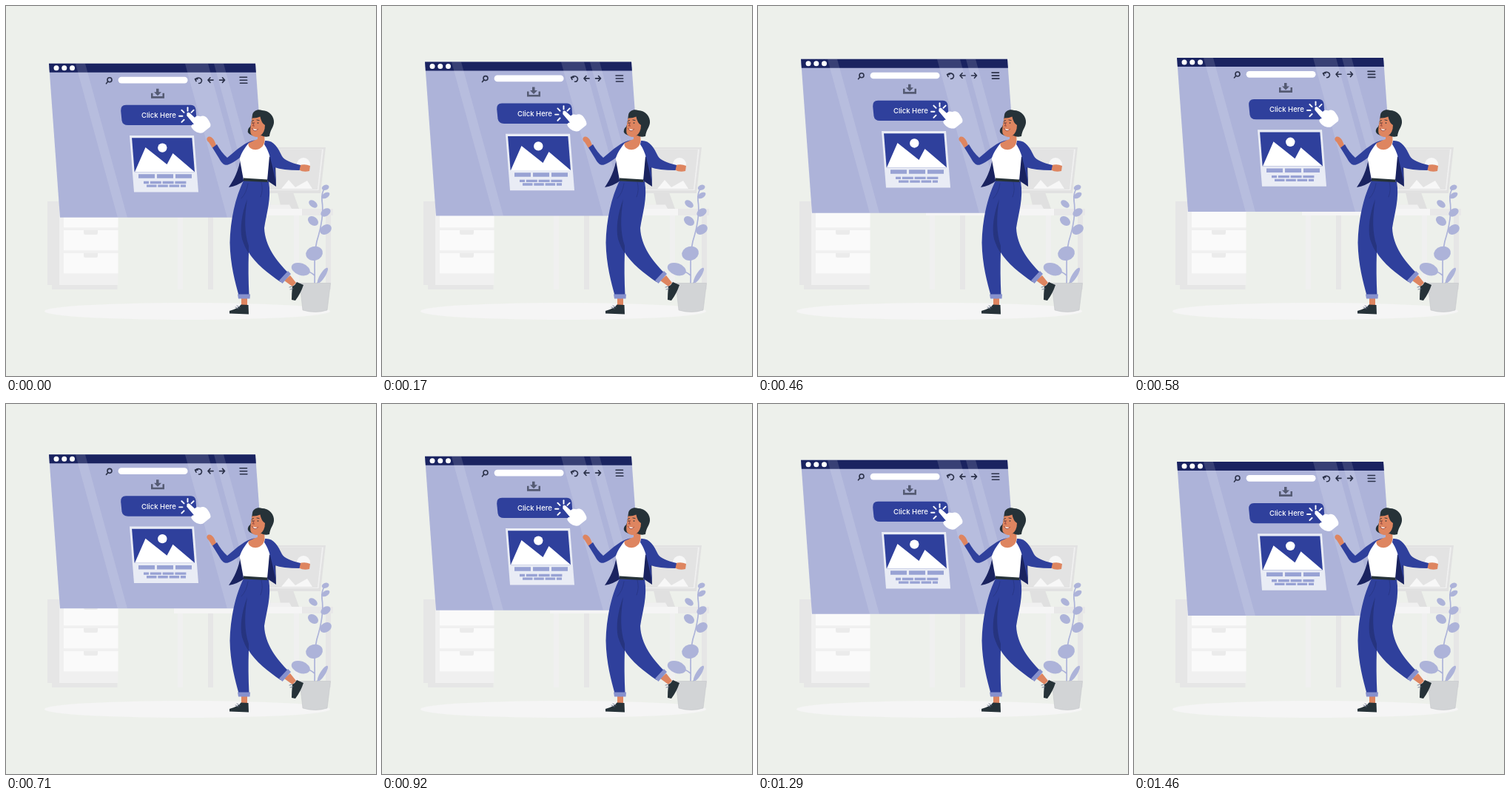
These frames come from a looping animation (500 by 500 pixels, 1500 ms). An HTML page:

```html
<!DOCTYPE html>
<html lang="en">
<head>
<meta charset="utf-8">
<title>Click Here</title>
<style>
  html, body { margin: 0; width: 100%; height: 100%; overflow: hidden; background: #edf0eb; }
  svg { display: block; width: 100%; height: 100%; }
  .blue { fill: #2f409c; } .navy { fill: #1a2360; } .lilac { fill: #adb3d9; }
  .skin { fill: #de8560; } .dark { fill: #263238; } .white { fill: #fff; }
  .line { fill: none; stroke-linecap: round; stroke-linejoin: round; }
  .dashes { fill: none; stroke: #98a2d4; }
  text { font: 500 9.5px Inter, "Open Sans", sans-serif; }
</style>
</head>
<body>
<svg viewBox="0 0 500 500">
  <ellipse cx="245" cy="412.5" rx="193" ry="11.5" fill="#f5f5f5"/>

  <g id="cabinet">
    <path fill="#e6e6e6" d="M56 264H72V377H56ZM62 377H150.5V383H62Z"/>
    <path fill="#f0f0f0" d="M72 264H151.5V377H72Z"/>
    <g id="drawer">
      <path fill="#fafafa" d="M78 272h73.5v27.300h-73.5Z"/>
      <path fill="#ebebeb" d="M105 272h19v4q0 2-2 2h-15q-2 0-2-2Z"/>
    </g>
    <use href="#drawer" y="31"/>
    <use href="#drawer" y="62"/>
  </g>

  <g id="desk">
    <path fill="#f0f0f0" d="M232 283h7v100h-7ZM389 283h7v100h-7Z"/>
    <path fill="#e6e6e6" d="M273 283h7v100h-7ZM432 283h7v100h-7Z"/>
    <path fill="#f5f5f5" d="M227 274H400V283H227Z"/>
    <path fill="#e8e8e8" d="M400 274H442V283H400Z"/>
    <path fill="#e0e0e0" d="M367 252H388L396 274H372Z"/>
    <path fill="#f0f0f0" d="M340 268.5H383L386 274H340Z"/>
    <path fill="#e1e1e1" d="M352 191H432L425 253H345Z"/>
    <path fill="#f0f0f0" d="M352 193.5H429L422.5 249H346Z"/>
    <path fill="#e3e3e3" d="M352 194H427L421 248H346Z"/>
    <circle cx="402" cy="214" r="9" fill="#f7f7f7"/>
    <path fill="#f7f7f7" d="M372 247L382 235L391 245L407 236L414 247Z"/>
  </g>

  <g id="plant" class="lilac">
    <path class="line" stroke="#adb3d9" stroke-width="1.7" d="M417 376C418 352 415 340 420 318C425 302 430 282 427 263Q426 252 431 246M417 364Q410 358 400 356M420 376L428 362"/>
    <g id="sprig"></g>
    <ellipse cx="431.5" cy="245.5" rx="5" ry="3.5" transform="rotate(-20 431 245)"/>
    <ellipse cx="416.500" cy="334.500" rx="11.5" ry="9.5" transform="rotate(-15 416 334)"/>
    <ellipse cx="398.500" cy="355.500" rx="13" ry="8" transform="rotate(20 398 355)"/>
    <ellipse cx="428" cy="364" rx="12" ry="3.5" transform="rotate(-58 428 364)"/>
    <path fill="#d2d4d6" stroke="#c4c7ca" stroke-width=".6" d="M397 374.500H438.500L434 411Q418 416 401 411Z"/>
  </g>

  <g id="window">
    <g transform="translate(58 78) skewX(4.12)">
      <rect class="lilac" width="279" height="208"/>
      <rect class="navy" width="279" height="12"/>
    </g>
    <g transform="translate(94 78) skewX(15.3)" fill="#fff" opacity=".13">
      <rect width="13" height="208"/>
      <rect x="148" width="31" height="208"/>
      <rect x="187" width="13" height="208"/>
    </g>
    <path class="line" stroke="#fff" stroke-width="7" stroke-dasharray="0 10.75" d="M68 84H90"/>
    <path class="line" stroke="#fff" stroke-width="8.7" d="M156 100.300H241.200"/>

    <g class="line" stroke="#2b3149" stroke-width="1.6">
      <circle cx="140" cy="100" r="3"/>
      <path d="M137.800 102.300L135.500 105M255.500 98.800H259M255.500 98.800L257 101.800M256 99C259 95.800 264.500 97.300 264.500 101.200Q264 104.700 260.500 104.700"/>
      <path id="arrow" d="M280 100.300H273M276 97L273 100.300L276 103.600"/>
      <use href="#arrow" transform="translate(568.5) scale(-1 1)"/>
      <path d="M316 96.400h9.500m-9.300 4h9.500m-9.300 4h9.500"/>
    </g>
    <path fill="#555b73" d="M196 118H198.500V122.300H211.500V118H214V125H196ZM203 112H206.500V116.500H210L205 121.500L200 116.500H203Z"/>

    <path class="blue" d="M162 134H250Q255.500 134 256.500 140L257.500 154Q258 161.300 252 161.300H165Q157.500 161.300 156.500 155L155.200 142Q154.800 134 162 134Z"/>
    <text class="white" x="183" y="151.200">Click Here</text>

    <g transform="translate(167 175.200) skewX(4.5)">
      <rect width="87" height="76.5" fill="#e9ecf5"/>
      <rect class="blue" x="2.8" y="3.3" width="81.300" height="46"/>
    </g>
    <path class="white" d="M174 224.500L188.500 191.300L217.500 214.300L225.500 199.300L255 224.500Z"/>
    <circle class="white" cx="211.300" cy="191.800" r="6.2"/>
    <path class="dashes" stroke-width="5.5" stroke-dasharray="22 3" d="M179 230.300H251"/>
    <path class="dashes" stroke-width="3.3" stroke-dasharray="15 1.8" stroke-dashoffset="8" d="M186 238.700H245"/>
    <path class="dashes" stroke-width="3.3" stroke-dasharray="13.5 1.8" d="M190 243.400H243"/>

    <path class="white" d="M244.500 145C246 143 248 144 249 145.500L255 151C257 148.300 260.500 148.500 262.500 149.500C266 147.500 270 149 272 152Q278 160 276 163.500L266 171.500C260 173 254 169.500 250.800 164.500C249.500 162 251.500 160 254 160L244.300 148.500Z"/>
    <g id="rays" class="line" stroke="#fff" stroke-width="1.9"></g>
  </g>

  <g id="woman">
    <path class="skin" d="M318 394H326V405H318ZM376 371L384 364L392 374L387 379Z"/>
    <path class="dark" d="M302 412Q314 409 317.500 403.500L327.500 404L328 416.500L302 415.500ZM387 379Q391 377 393 373L402 377Q398 389 391 398L386 397Q386 389 387 379Z"/>
    <path class="line" stroke="#6f7890" stroke-width=".9" d="M310 407l4 2m-2-4l4 2M383 380l4-1m-3 4l4-1"/>

    <path class="navy" d="M317 205C315 221 308 235 301 245Q313 243 322 236L326 215Z"/>
    <path class="blue" d="M321 236C310 258 303 290 302.500 320C303 350 310 374 314.500 391H328.500Q327 360 328 333C336 347 355 362 371 373L381 360C366 345 350 325 349 300C352 280 359 260 355 237Z"/>
    <path fill="#26347f" d="M326 261C318 282 316 301 319 315Q323 327 328 334V324C322 307 322 285 326 261Z"/>
    <path class="line" stroke="#26347f" stroke-width=".7" d="M345 238Q348 249 344 258M327 240Q325 253 318 260"/>
    <path fill="#8791cd" d="M313 389.500H330L329.500 395.500H314ZM369 371L381 358L385 362L373.500 375Z"/>

    <path class="white" d="M328 184C321 192 315 200 316 208L321 235L353 236L358 200L350 182Z"/>
    <path class="dark" d="M321 232.500L353.500 234.500V238L321 236.500Z"/>
    <path class="skin" d="M340 172L349 168L349.500 182C349 191 341 195 335 194C329 193 326 188 328 184L340 180Z"/>

    <path class="skin" d="M284 188C282 182 279 176 274 176.500C270 178 271 182 274 184L279 192ZM396 215.500Q404 213 411 216L410 223Q402 225 396 221.500Z"/>
    <path class="blue" d="M279 191.500L285 187Q291 198 299 205C312 194 324 183 337 181L328 185Q319 196 316 205Q307 212 300 214.500C295 216 291 212 288 206Z"/>
    <path class="navy" d="M356 203L364 213L365 244L353 236Z"/>
    <path class="blue" d="M350 182C361 181 367 190 373 203Q377 210 398 215L396.500 222Q374 222 363 218L365 240Q361 220 357 205Q354 194 349 187Z"/>

    <path class="dark" d="M333 147C334 141 341 139 346 141C356 141 363 150 362 158C361 165 357 167 356 176Q350 178 345 175Q336 178 329 173Q325 170 328 165Q331 163 331.500 158Z"/>
    <path class="skin" d="M332.500 151.500C331.500 159 329 168 331 173Q336 179 343 176Q350 171 350 161Q345 158 343.500 149.500Q338 152 332.500 151.500Z"/>
    <path class="white" d="M333 166L340 167Q336 170.500 333 166Z"/>
    <path class="line" stroke="#8f3f38" stroke-width=".9" d="M332.500 165.500Q336 171.500 340.500 166.500M335.500 157.500L333.500 162H335.500"/>
    <path class="line" stroke="#263238" stroke-width=".9" d="M332.500 155.500l2-1m4.500-.5l3 .5"/>
    <path class="line" stroke="#263238" stroke-width="1.7" d="M333.500 158h0m7 0h0"/>
  </g>
</svg>
<script>
  const byId = id => document.getElementById(id);
  const repeat = (count, draw) => Array.from({ length: count }, (_, i) => draw(i)).join('');

  // Leaves alternate along the stem and grow towards the pot.
  byId('sprig').innerHTML = repeat(5, i => {
    const side = i % 2 ? -1 : 1;
    const place = `translate(${423.5 + side * 8.5} ${256 + i * 11.5}) rotate(${side < 0 ? 38 : -32})`;
    return `<ellipse rx="${6 + i * 0.6}" ry="${3.5 + i * 0.7}" transform="${place}"/>`;
  });

  // Five rays fan out around the fingertip.
  byId('rays').innerHTML = repeat(5, i =>
    `<path d="M7 0H11.5" transform="translate(245.5 149) rotate(${135 + i * 45})"/>`);

  const LOOP = 1500, STEP = LOOP / 36, LIFT = 10, LEAD = 30, REST = 0.2;

  // The window floats up and down at constant speed, 24 poses a second.
  function draw() {
    const time = Math.floor((performance.now() + 4) / STEP) * STEP;
    const phase = (time + LEAD) % LOOP / LOOP;
    const lift = LIFT * (1 - Math.abs(1 - 2 * phase));
    byId('window').setAttribute('transform', `translate(0 ${(REST - lift).toFixed(2)})`);
    requestAnimationFrame(draw);
  }
  draw();
</script>
</body>
</html>
```
